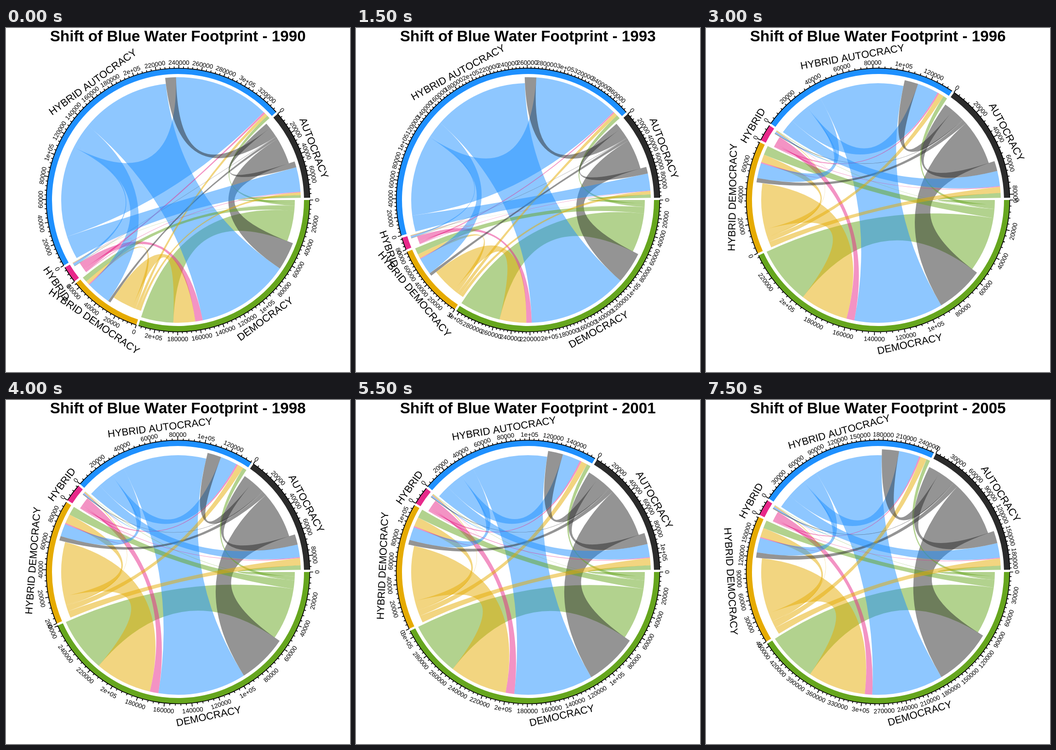
Animation of 748 by 748 pixels, one loop 8 s. Source, as an HTML page:

```html
<!DOCTYPE html>
<html lang="en">
<head>
<meta charset="utf-8">
<title>Shift of Blue Water Footprint</title>
<style>
  html, body { margin: 0; width: 100%; height: 100%; overflow: hidden; background: #fff; }
  svg { display: block; width: 748px; height: 748px; }
  text { font-family: "Liberation Sans", Arial, sans-serif; font-kerning: none; text-anchor: middle; }
  .title { font-size: 33.25px; font-weight: bold; }
  .name { font-size: 22.2px; }
  .tick { font-size: 13.7px; }
  .axis { fill: none; stroke: #000; stroke-width: 1.7; }
  .year { visibility: hidden; animation: show 8s step-end infinite; }
  @keyframes show {
    0% { visibility: visible; }
    6.25%, 100% { visibility: hidden; }
  }
</style>
</head>
<body>
<svg id="stage" viewBox="0 0 748 748"></svg>
<script>
const C = 374, OUTER = 286.5, INNER = 274, FROM_R = 254, TO_R = 267, GAP = 1;
const FIRST = 1990, COUNT = 16;
// Sectors run clockwise from three o'clock in this order.
const SECTORS = [
  ['DEMOCRACY', '#66A61E'],
  ['HYBRID DEMOCRACY', '#E6AB02'],
  ['HYBRID', '#E7298A'],
  ['HYBRID AUTOCRACY', '#1E90FF'],
  ['AUTOCRACY', '#2B2B2B']
];
const N = SECTORS.length;

// Key years: overall volume (thousands), each sector's flow to DEMOCRACY,
// then HYBRID AUTOCRACY's flow to itself and to its neighbours, relative to that.
const KEYS = [
  { year: 1990, volume: 709, flow: [15.2, 10.3, 3.5, 44.2, 13.2], self: 1.016, spread: .26 },
  { year: 1992, volume: 1258, flow: [9.7, 6.4, 1.7, 51.3, 7.8], self: 1.42, spread: .145 },
  { year: 1994, volume: 494, flow: [29, 18.7, 3.4, 42.6, 22], self: .285, spread: .195 },
  { year: 1998, volume: 592, flow: [26, 27.2, 4.1, 42, 23.6], self: .19, spread: .143 },
  { year: 2003, volume: 785, flow: [25.6, 27.6, 4.1, 34.7, 26.1], self: .25, spread: .182 },
  { year: 2005, volume: 1096, flow: [23.5, 27.4, 3.5, 33.8, 27.7], self: .287, spread: .203 }
];

function stateAt(year) {
  const n = Math.max(1, KEYS.findIndex(k => k.year >= year));
  const p = KEYS[n - 1], q = KEYS[n], t = (year - p.year) / (q.year - p.year);
  const lerp = (a, b) => a + (b - a) * t;
  return {
    volume: lerp(p.volume, q.volume),
    flow: p.flow.map((v, i) => lerp(v, q.flow[i])),
    self: lerp(p.self, q.self),
    spread: lerp(p.spread, q.spread)
  };
}

// Every sector splits its flow in fixed proportions; columns are the receivers.
function matrix({ flow, self, spread }) {
  const pull = 1 + self / 2;
  const shares = [
    [1, .16, .008, .065 * pull, .085],
    [1, .16, .017, .095 * pull, .125],
    [1, .15, .05, .18 * pull, .1],
    [1, spread, spread / 10, self, spread],
    [1, .09, .015, .255 * pull, .21]
  ];
  return shares.map((row, i) => row.map(s => s * flow[i]));
}

const sum = list => list.reduce((s, v) => s + v, 0);
const pt = (r, deg) => {
  const t = deg * Math.PI / 180;
  return (C + r * Math.cos(t)).toFixed(2) + ' ' + (C + r * Math.sin(t)).toFixed(2);
};
const arc = (r, a, b, sweep = 1) =>
  `A${r} ${r} 0 ${Math.abs(b - a) > 180 ? 1 : 0} ${sweep} ${pt(r, b)}`;

// Text set along the tangent, always turned to read the right way up.
function label(str, r, deg, cls) {
  const lower = deg < 180, turn = lower ? deg - 90 : deg + 90;
  return `<text class="${cls}" dy=".36em" transform="translate(${pt(lower ? r + 3 : r, deg)}) ` +
    `rotate(${turn.toFixed(2)})">${str}</text>`;
}

function chord(from, to, color) {
  return `<path fill="${color}" fill-opacity=".5" d="M${pt(FROM_R, from[0])}${arc(FROM_R, ...from)}` +
    `Q${C} ${C} ${pt(TO_R, to[0])}${arc(TO_R, ...to)}Q${C} ${C} ${pt(FROM_R, from[0])}Z"/>`;
}

const tickText = v => v && v % 1e5 === 0 ? v / 1e5 + 'e+05' : String(v);

// One significant digit of the amount that spans ten degrees.
function majorStep(perDeg) {
  const raw = perDeg * 10, unit = 10 ** Math.floor(Math.log10(raw));
  return Math.round(raw / unit) * unit;
}

function axis(start, end, perDeg) {
  const major = majorStep(perDeg), minor = major / 5;
  let d = `M${pt(OUTER, start)}${arc(OUTER, start, end)}`, labels = '';
  for (let n = 0; n * minor <= (end - start) * perDeg; n++) {
    const deg = start + n * minor / perDeg, isMajor = n % 5 === 0;
    d += `M${pt(OUTER, deg)}L${pt(OUTER + (isMajor ? 7.5 : 4), deg)}`;
    if (isMajor) labels += label(tickText(n * minor), 299, deg, 'tick');
  }
  return `<path class="axis" d="${d}"/>` + labels;
}

function diagram(year) {
  const state = stateAt(year), m = matrix(state);
  const span = 360 - N * GAP;
  const scale = span / (2 * sum(m.map(sum)));
  const perDeg = state.volume * 1000 / span;
  const out = m.map(() => []), into = m.map(() => []);
  let pos = 0, rim = '', links = '';

  const take = v => [pos, pos += v * scale];
  SECTORS.forEach(([name, color], i) => {
    const start = pos;
    for (let j = N - 1; j >= 0; j--) out[i][j] = take(m[i][j]);
    for (let j = N - 1; j >= 0; j--) into[i][j] = take(m[j][i]);
    rim += `<path fill="${color}" d="M${pt(OUTER, start)}${arc(OUTER, start, pos)}` +
      `L${pt(INNER, pos)}${arc(INNER, pos, start, 0)}Z"/>` +
      axis(start, pos, perDeg) + label(name, 317, (start + pos) / 2, 'name');
    pos += GAP;
  });

  for (let to = 0; to < N; to++)
    for (let from = 0; from < N; from++)
      links += chord(out[from][to], into[to][from], SECTORS[from][1]);

  return `<text class="title" x="373.7" y="29">Shift of Blue Water Footprint - ${year}</text>` + links + rim;
}

document.getElementById('stage').innerHTML = Array.from({ length: COUNT }, (_, i) =>
  `<g class="year" style="animation-delay:${i ? i * .5 - 8 : 0}s">${diagram(FIRST + i)}</g>`
).join('');
</script>
</body>
</html>
```
